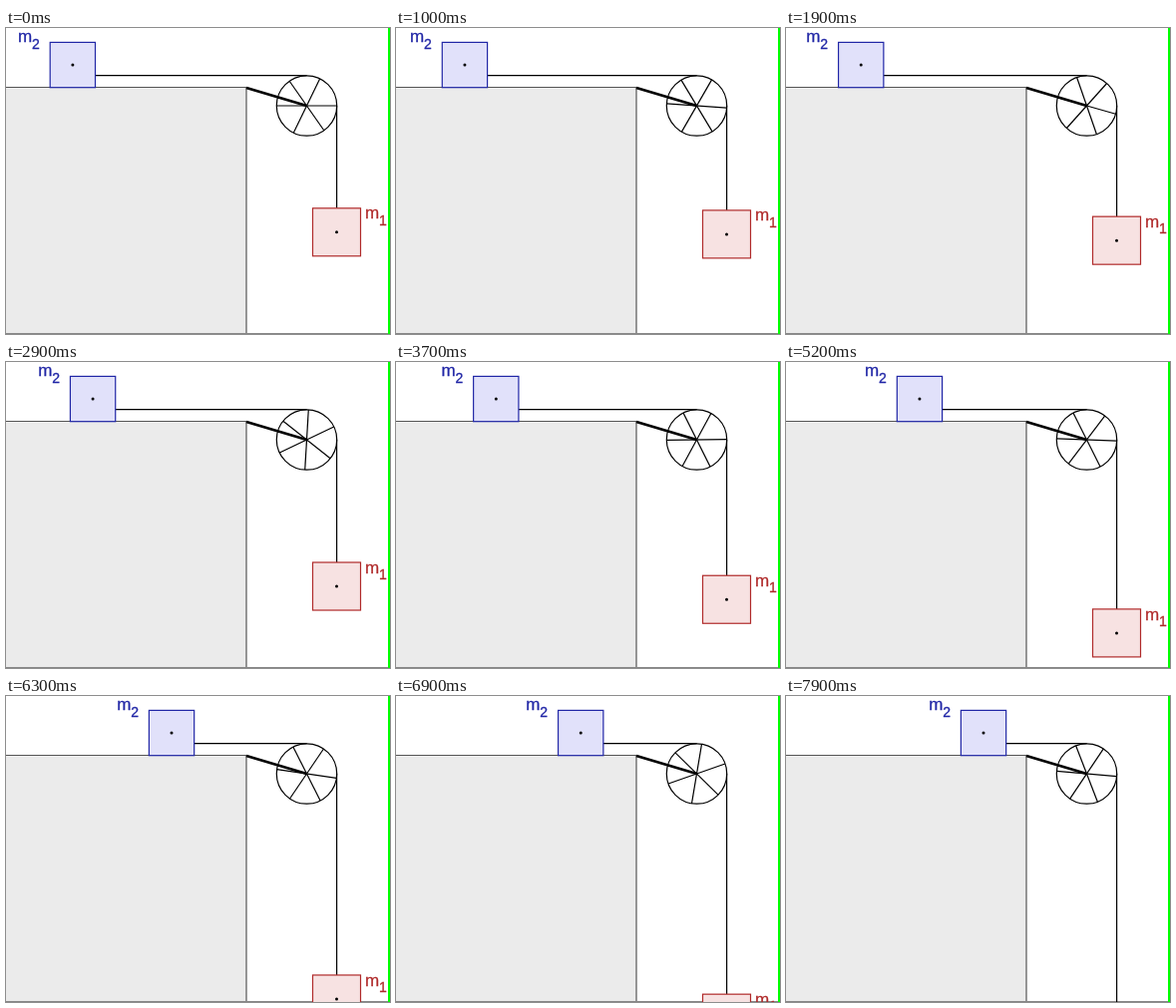
An HTML page with a canvas that plays this animation: 385x307 px, repeating every 8 s.

```html
<!DOCTYPE html>
<html>
<head>
<meta charset="utf-8">
<style>
html, body { margin: 0; width: 100%; height: 100%; overflow: hidden; background: #fff; }
canvas { display: block; }
</style>
</head>
<body>
<canvas id="stage" width="385" height="307"></canvas>
<script>
const ctx = document.getElementById('stage').getContext('2d');
const LOOP = 8000, STEP = 100, LAST_STEP = 72;
const ACCEL = 0.0258, RELEASE = 62;
const WHEEL = { x: 301.5, y: 78, r: 30.2 };
const SPOKES = [0, 55, 116].map(deg => deg * Math.PI / 180);
const BLUE = '#2026a6', RED = '#b02a2a';

// Constant acceleration, then constant speed after the release step.
function travel(step) {
  const k = Math.min(step, RELEASE);
  return ACCEL * k * k + 2 * ACCEL * k * (step - k);
}

function line(x1, y1, x2, y2, width = 1.2, color = '#000') {
  ctx.strokeStyle = color;
  ctx.lineWidth = width;
  ctx.beginPath();
  ctx.moveTo(x1, y1);
  ctx.lineTo(x2, y2);
  ctx.stroke();
}

function mass(x, y, size, fill, stroke) {
  ctx.fillStyle = fill;
  ctx.fillRect(x, y, size, size);
  ctx.strokeStyle = stroke;
  ctx.lineWidth = 1.2;
  ctx.strokeRect(x, y, size, size);
  ctx.fillStyle = '#000';
  ctx.beginPath();
  ctx.arc(x + size / 2, y + size / 2, 1.5, 0, Math.PI * 2);
  ctx.fill();
}

function label(x, y, sub, color) {
  const write = (text, size, tx, ty) => {
    ctx.font = `${size}px "Liberation Sans", Arial, sans-serif`;
    ctx.fillText(text, tx, ty);
    ctx.strokeText(text, tx, ty);
  };
  ctx.fillStyle = ctx.strokeStyle = color;
  ctx.lineWidth = 0.3;
  write('m', 17, x, y);
  write(sub, 14, x + 14, y + 6.5);
}

function wheel(angle) {
  const { x, y, r } = WHEEL;
  ctx.strokeStyle = '#000';
  ctx.lineWidth = 1.2;
  ctx.beginPath();
  ctx.arc(x, y, r, 0, Math.PI * 2);
  ctx.stroke();
  for (const spoke of SPOKES) {
    const dx = r * Math.cos(spoke + angle), dy = r * Math.sin(spoke + angle);
    line(x - dx, y - dy, x + dx, y + dy);
  }
}

function table() {
  ctx.fillStyle = '#ebebeb';
  ctx.fillRect(0, 59.5, 241, 247.5);
  line(0, 59.5, 241, 59.5, 1, '#555');
  line(241, 59.5, 241, 307, 1.2, '#555');
  line(0, 306.5, 383, 306.5, 1, '#888');
}

function draw(time) {
  const step = Math.max(0, Math.min(LAST_STEP, Math.floor(time / STEP) - 1));
  const d = travel(step);
  const left = 44.2 + d, top = 180.8 + d;

  ctx.fillStyle = '#fff';
  ctx.fillRect(0, 0, 385, 307);
  table();
  line(left + 45.3, 47.6, WHEEL.x, 47.6);
  line(331.6, WHEEL.y, 331.6, top);
  wheel(d / WHEEL.r);
  line(241, 60, WHEEL.x, WHEEL.y, 2.8);
  mass(left, 14.4, 45.3, '#e1e1fa', BLUE);
  label(12 + d, 14.2, '2', BLUE);
  mass(307.5, top, 48, '#f7e2e2', RED);
  label(360, 191.4 + d, '1', RED);
  ctx.fillStyle = '#00ff00';
  ctx.fillRect(383, 0, 2, 307);
}

const start = performance.now();
function tick() {
  draw((performance.now() - start) % LOOP);
  requestAnimationFrame(tick);
}
tick();
</script>
</body>
</html>
```
